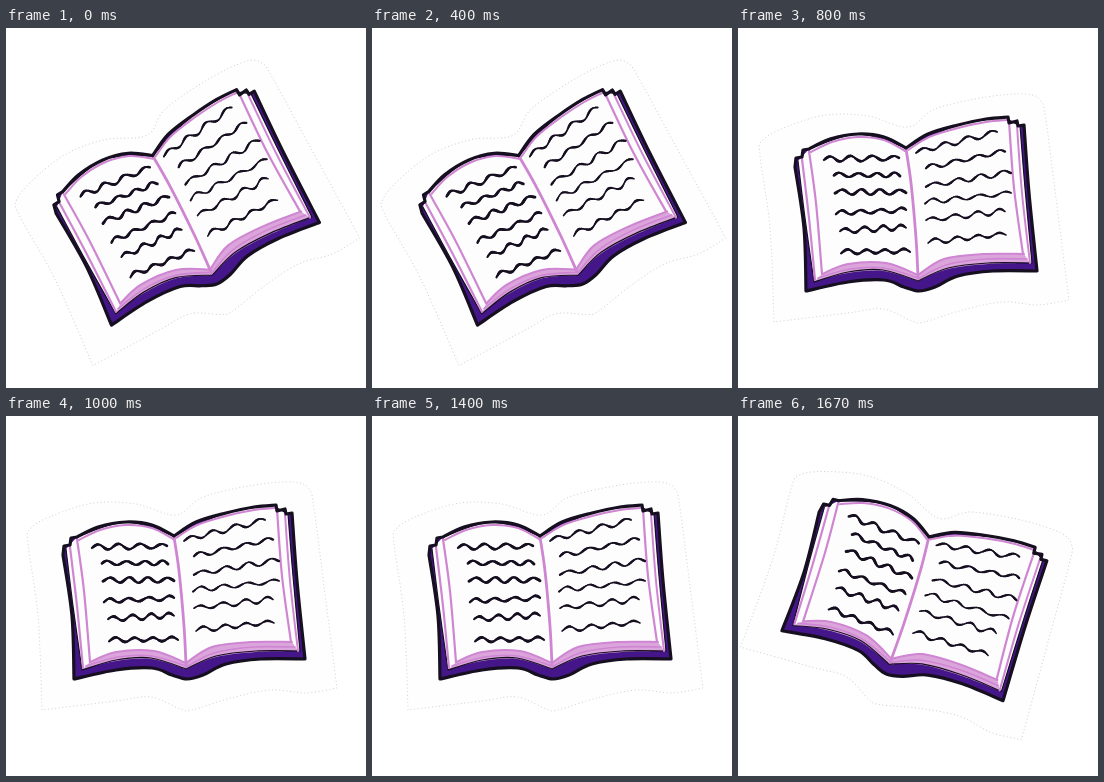
These frames come from a looping animation (360 px wide and 360 px high, 2.39 s). An HTML page with a canvas:

```html
<!DOCTYPE html>
<html lang="en">
<head>
<meta charset="utf-8">
<title>Rocking book</title>
<style>
html, body { margin: 0; width: 100%; height: 100%; overflow: hidden; background: #fff; }
canvas { display: block; width: 100vw; height: 100vh; }
</style>
</head>
<body>
<canvas id="stage" width="360" height="360"></canvas>
<script>
const ctx = document.getElementById('stage').getContext('2d');
const LOOP = 2390;
const PIVOT = [183, 253];
const INK = '#160f20', PURPLE = '#45158a', PINK = '#cf86d2', PALE = '#dba5dc';

// start time, pivot position, tilt in degrees
const POSES = [
  { at: 0, x: 209, y: 246, tilt: -21.3 },
  { at: 800, x: 183, y: 253, tilt: 0 },
  { at: 1600, x: 154, y: 249.5, tilt: 22.5 }
];

// Smooth curve through points given as "x,y x,y ..."
function addCurve(path, text, join) {
  const p = text.split(' ').map(s => s.split(',').map(Number));
  if (join) path.lineTo(...p[0]); else path.moveTo(...p[0]);
  for (let i = 0; i < p.length - 1; i++) {
    const a = p[i - 1] || p[i], b = p[i], c = p[i + 1], d = p[i + 2] || c;
    path.bezierCurveTo(
      b[0] + (c[0] - a[0]) / 6, b[1] + (c[1] - a[1]) / 6,
      c[0] - (d[0] - b[0]) / 6, c[1] - (d[1] - b[1]) / 6, c[0], c[1]);
  }
}

function shape(...parts) {
  const path = new Path2D();
  parts.forEach((part, i) => addCurve(path, part, i > 0));
  return path;
}

function stroke(path, color, width) {
  ctx.strokeStyle = color;
  ctx.lineWidth = width;
  ctx.stroke(path);
}

function fill(path, color) {
  ctx.fillStyle = color;
  ctx.fill(path);
}

const sticker = shape(
  '36,294 32,200 22,128 25,112 48,99 88,87 130,88 170,99 197,81 248,69 288,66 303,73 308,92 318,170 331,272',
  '331,272 300,277 265,274 225,282 186,294 174,293 145,281 110,285 36,294');

const topLeft = '71,121 92,111 120,106 146,109 168,120';
const topRight = '168,120 190,106 220,97 248,91 270,89';
const leftStep = ['57,139 58,130', '64,129 65,122', '71,121'];
const rightStep = ['271,95', '279,93 280,98', '286,97'];
const bottom = '299,243 255,243 220,248 197,259 181,263 166,259 146,252 110,254 68,263';
const cover = shape(...leftStep, topLeft, topRight, ...rightStep,
  '286,97 291,165 299,243', bottom, '68,263 66,200 57,139');

const pages = shape('60,133 67,190 76,254', '76,254 110,244 145,242 180,253',
  '180,253 210,240 250,235 294,235', '294,235 287,160 282,98',
  '271,92', '270,89 220,97 168,120', '168,120 120,106 71,121');

const edgeBand = shape('84,246 110,236 148,235 180,247', '180,247 206,231 245,226 286,226',
  '292,235 250,236 210,241 180,253', '180,253 145,243 110,245 77,253');

const pinkLines = [
  ['71,123 78,175 84,246', 2.2],
  ['64,131 71,190 77,252', 2.2],
  ['84,246 110,236 148,235 180,247', 2],
  ['80,250 112,241 146,240 180,250', 1.6],
  ['271,93 276,160 285,226', 2.2],
  ['279,98 284,165 292,235', 2],
  ['286,226 245,226 206,231 180,247', 2],
  ['289,231 248,231 208,237 180,251', 1.6],
  ['168,121 173,155 178,210 180,249', 2.8],
  ['73,124 94,114 120,109 146,112 167,123', 2],
  ['170,122 191,109 220,100 248,94 269,92', 2]
].map(([text, width]) => [shape(text), width]);

// x0, y0, x1, y1, width
const writing = [
  [86, 131, 161, 130, 2.4], [96, 147, 162, 147, 2.4], [97, 164, 168, 164, 2.5],
  [98, 185, 168, 182, 2.4], [102, 203, 168, 199, 2.4], [103, 224, 172, 223, 2.5],
  [178, 124, 259, 104, 2], [188, 140, 267, 123, 2], [188, 158, 273, 144, 1.9],
  [187, 174, 273, 165, 1.8], [188, 192, 267, 183, 1.9], [190, 214, 268, 206, 2]
];

function scribble([x0, y0, x1, y1, width], row) {
  const steps = 48, waves = 3.6;
  const at = t => {
    const lift = Math.sin(t * waves * 2 * Math.PI - 0.4 + 0.3 * Math.sin(row * 2 + t * 5));
    const size = 2.3 + 0.5 * Math.sin(row * 3 + t * 4);
    return [x0 + (x1 - x0) * t, y0 + (y1 - y0) * t - lift * size];
  };
  ctx.strokeStyle = INK;
  for (let i = 0; i < steps; i++) {
    const t = i / steps;
    ctx.lineWidth = width + 0.45 * Math.sin(t * waves * 4 * Math.PI + row);
    ctx.beginPath();
    ctx.moveTo(...at(t));
    ctx.lineTo(...at(t + 1 / steps));
    ctx.stroke();
  }
}

function drawBook() {
  fill(sticker, '#fefefe');
  ctx.setLineDash([1, 2.6]);
  ctx.lineCap = 'butt';
  stroke(sticker, '#c6c6c6', 0.8);
  ctx.setLineDash([]);
  ctx.lineCap = ctx.lineJoin = 'round';

  fill(cover, PURPLE);
  fill(pages, '#fefdfe');
  fill(edgeBand, PALE);
  stroke(pages, INK, 1.2);
  for (const [path, width] of pinkLines) stroke(path, PINK, width);
  stroke(cover, INK, 3.2);
  writing.forEach(scribble);
}

function draw(time) {
  const pose = POSES.filter(p => p.at <= time).pop();
  ctx.setTransform(1, 0, 0, 1, 0, 0);
  fill(new Path2D('M0 0H360V360H0Z'), '#fff');
  ctx.translate(pose.x, pose.y);
  ctx.rotate(pose.tilt * Math.PI / 180);
  ctx.translate(-PIVOT[0], -PIVOT[1]);
  drawBook();
}

const start = performance.now();
function tick() {
  draw((performance.now() - start) % LOOP);
  requestAnimationFrame(tick);
}
tick();
</script>
</body>
</html>
```
